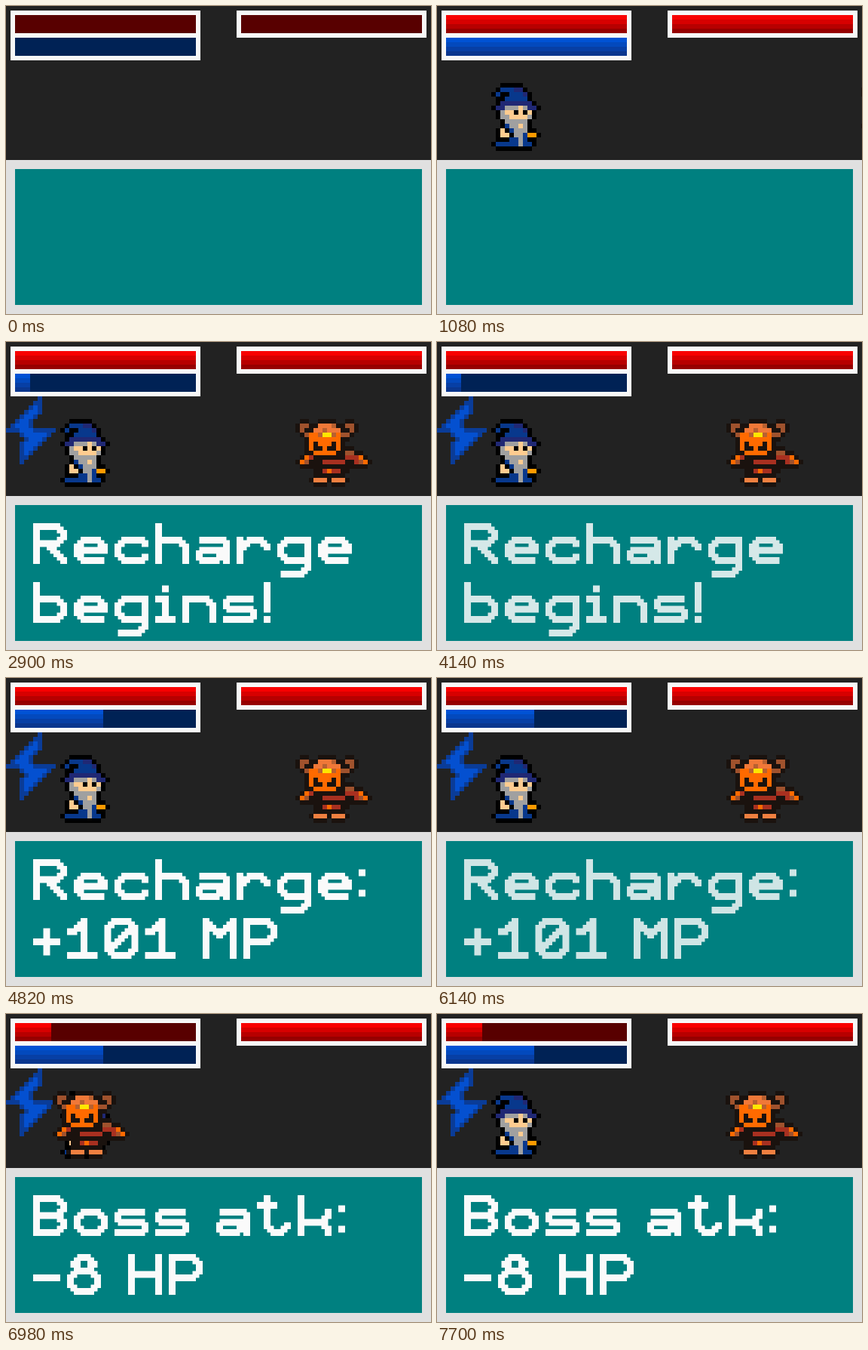
Recreate the animation shown at these times as an HTML page with a canvas. Size 564 by 408 pixels, loop 8000 ms.

```html
<!DOCTYPE html>
<html lang="en">
<head>
<meta charset="utf-8">
<title>Boss battle</title>
<style>
  html, body { margin: 0; width: 100%; height: 100%; overflow: hidden; background: #222; }
  canvas { display: block; width: 564px; height: 408px; }
</style>
</head>
<body>
<canvas id="stage" width="564" height="408"></canvas>
<script>
const LOOP = 8000;
const CELL = 6;      // sprite pixel
const UNIT = 4.5;    // font pixel
const ctx = document.getElementById('stage').getContext('2d');

const clamp = v => Math.max(0, Math.min(1, v));
const span = (t, start, length) => clamp((t - start) / length);
const quadOut = u => 1 - (1 - u) ** 2;
const quadInOut = u => u < .5 ? 2 * u * u : 1 - 2 * (1 - u) ** 2;
const cubicInOut = u => u < .5 ? 4 * u ** 3 : 1 - 4 * (1 - u) ** 3;
const mix = (a, b, u) => a + (b - a) * u;
const points = text => text.split(' ').map(p => p.split(',').map(Number));

// Pen strokes of a 2x2 brush; every bend inside a stroke is rounded.
const STEM = '0,0 0,10';
const ARCH = '0,4 8,4 8,10';
const GLYPHS = {
  R: [STEM, '0,0 8,0 8,5 0,5', '3,5 8,10'],
  B: [STEM, '0,0 8,0 8,5 0,5', '0,5 8,5 8,10 0,10'],
  H: [STEM, '8,0 8,10', '0,5 8,5'],
  M: [STEM, '8,0 8,10', '0,0 4,4', '4,4 8,0'],
  P: [STEM, '0,0 8,0 8,6 0,6'],
  a: ['1,4 7,4 8,5 8,10', '8,7 0,7 0,10 5,10 6,9'],
  b: [STEM, '0,4 8,4 8,10 0,10'],
  c: ['8,5 8,4 0,4 0,10 8,10 8,9'],
  e: ['8,7 8,4 0,4 0,10 7,10', '0,7 8,7'],
  g: ['8,4 0,4 0,10 8,10', '8,4 8,14 1,14'],
  h: [STEM, ARCH],
  i: ['2,1 2,1', '0,4 2,4', '2,4 2,10', '0,10 4,10'],
  k: [STEM, '0,7 8,7 8,4', '0,7 8,7 8,10'],
  n: ['0,4 0,10', ARCH],
  o: ['4,4 8,4 8,10 0,10 0,4 4,4'],
  r: ['0,4 0,10', '1,6 3,4', '3,4 8,4 8,6'],
  s: ['7,4 0,4 0,7 8,7 8,10 0,10'],
  t: ['2,0 2,10 8,10 8,8', '0,2 4,2'],
  0: ['4,0 8,0 8,10 0,10 0,0 4,0', '1,8 7,2'],
  1: ['0,3 1,3', '1,3 4,0', '4,0 4,10', '0,10 7,10'],
  8: ['4,0 7,0 7,4 1,4 1,0 4,0', '4,4 8,4 8,10 0,10 0,4 4,4'],
  '+': ['0,6 6,6', '3,3 3,9'],
  '-': ['0,6 6,6'],
  ':': ['0,3 0,3', '0,9 0,9'],
  '!': ['0,0 0,7', '0,10 0,10'],
  ' ': []
};

const reach = (a, b) => Math.max(Math.abs(b[0] - a[0]), Math.abs(b[1] - a[1]));
const toward = (a, b, d) => [0, 1].map(i => a[i] + (b[i] - a[i]) * d / reach(a, b));

function rounded(pts) {
  const last = pts.length - 1;
  return pts.flatMap((p, i) => {
    if (i === 0 || i === last) return [p];
    const before = reach(p, pts[i - 1]) * (i === 1 ? 1 : .5);
    const after = reach(p, pts[i + 1]) * (i === last - 1 ? 1 : .5);
    const r = Math.min(2, Math.floor(before), Math.floor(after));
    return [toward(p, pts[i - 1], r), toward(p, pts[i + 1], r)];
  });
}

function stroke(path, pts, x, y) {
  for (let i = 1; i < pts.length; i++) {
    const [a, b] = [pts[i - 1], pts[i]];
    const n = reach(a, b) || 1;
    for (let k = 0; k <= n; k++) {
      const [u, v] = [0, 1].map(j => Math.round(mix(a[j], b[j], k / n)));
      path.rect(x + u * UNIT, y + v * UNIT, 2 * UNIT, 2 * UNIT);
    }
  }
}

function message(...lines) {
  const path = new Path2D();
  lines.forEach((line, row) => {
    let x = 36;
    for (const ch of line) {
      const strokes = GLYPHS[ch].map(points);
      const width = Math.max(2, ...strokes.flat().map(p => p[0])) + 2;
      strokes.forEach(s => stroke(path, rounded(s), x, 240 + 78 * row));
      x += (ch === ':' || ch === '!' ? 4 : width + 2) * UNIT;
    }
  });
  return path;
}

// Two points give a box, more give a polygon.
function shape(text) {
  const pts = points(text);
  const path = new Path2D();
  if (pts.length === 2) {
    const [[x, y], [r, b]] = pts;
    path.rect(x, y, r - x, b - y);
  } else pts.forEach(p => path.lineTo(...p));
  return path;
}

// Samples the shapes on a coarse grid and edges the result with one colour.
function sprite(cols, rows, edge, inside, layers) {
  const image = document.createElement('canvas');
  image.width = cols * CELL;
  image.height = rows * CELL;
  const g = image.getContext('2d');
  const shapes = layers.flatMap(([color, ...list]) => list.map(s => [color, shape(s)]));
  const colorAt = (x, y) =>
    shapes.reduce((c, [color, path]) => g.isPointInPath(path, x + .5, y + .5) ? color : c, null);
  for (let y = 0; y < rows; y++) for (let x = 0; x < cols; x++) {
    const color = colorAt(x, y);
    const around = [colorAt(x - 1, y), colorAt(x + 1, y), colorAt(x, y - 1), colorAt(x, y + 1)];
    const onEdge = inside ? color && around.includes(null) : !color && around.some(Boolean);
    if (!color && !onEdge) continue;
    g.fillStyle = onEdge ? edge : color;
    g.fillRect(x * CELL, y * CELL, CELL, CELL);
  }
  return image;
}

const wizard = sprite(11, 15, '#000', false, [
  ['#08388c', '2,1 7,2', '1,2 2,3', '4,2 8,2 8,4 3,4', '3,9 4,10', '4,9 8,13', '1,13 9,14'],
  ['#202874', '5,1 7,2', '7,2 8,3', '2.4,4 8.6,4 10,6 1,6'],
  ['#a0a0a0', '3,5 8,6', '2,6 9,8', '3,8 8,8 8,11 7,11 7,14 6,14 6,12 5.6,12'],
  ['#ffcc90', '6,5 7,6', '3,6 9,7', '4,7 8,8', '6,9 7,10', '2,10 3,12', '3,11 4,12'],
  ['#ff9a00', '8,11 10,12'],
  ['#000', '5,6 6,7', '7,6 8,7', '3,10 4,11', '4,11 5,12']
]);

const DARK = '#1a120e';
const boss = sprite(17, 15, DARK, false, [
  [DARK, '4,8 12,11', '5,11 11,12'],
  ['#a0522d', '1,1 3,2', '1,2 2,3', '2,3 4,4', '11,1 13,2', '12,2 13,3', '10,3 12,4', '11,7 13,8', '2,9 3,10', '14,9 15,10'],
  ['#ff6a00', '5.4,1 8.6,1 10,2.4 10,7 9,7 9,8 4,8 4,7 3,7 3,3'],
  ['#f07838', '5.4,1 8.6,1 10,2.4 10,3 3,3'],
  ['#b86030', '8,1 9,2', '6,2 7,3', '5,3 9,4'],
  ['#ffe600', '6,3 8,4'],
  [DARK, '4,5 5,7', '5,6 6,7', '8,5 9,7', '7,6 8,7'],
  ['#a83020', '3,8 4,9', '11,8 14,9', '6,9 11,10', '13,9 14,10', '6,11 10,12'],
  ['#ff6a00', '2,8 3,9', '1,9 2,10', '14,8 15,9', '15,9 16,10', '7,11 8,12'],
  ['#f08040', '4,13 7,14', '8,13 11,14']
]);

const bolt = sprite(11, 15, '#0a3c98', true, [
  ['#0450d0', '8,0 8,3 6,5 6,7 11,7 11,7.6 3.6,15 3,15 3,11 4,10 4,9 3,8 0,8 0,7.5']
]);

const begins = message('Recharge', 'begins!');
const gain = message('Recharge:', '+101 MP');
const attack = message('Boss atk:', '-8 HP');

const RED = [[248, 0, 0], [150, 0, 0]];
const BLUE = [[0, 82, 212], [10, 54, 142]];

function box(color, x, y, w, h) {
  ctx.fillStyle = color;
  ctx.fillRect(x, y, w, h);
}

function bar(x, y, value, empty, [top, bottom]) {
  box(empty, x, y, 240, 24);
  for (let i = 0; i < 4; i++) {
    const color = top.map((c, k) => Math.round(mix(c, bottom[k], i / 3)));
    box(`rgb(${color})`, x, y + i * CELL, Math.round(240 * value), CELL);
  }
}

function put(image, x, y, alpha = 1) {
  ctx.globalAlpha = alpha;
  ctx.drawImage(image, Math.round(x), y);
  ctx.globalAlpha = 1;
}

function say(path, alpha) {
  ctx.globalAlpha = alpha;
  ctx.fillStyle = '#fafafa';
  ctx.fill(path);
  ctx.globalAlpha = 1;
}

const tween = (t, start) => quadInOut(span(t, start, 480));
const fadeIn = (t, start) => quadOut(span(t, start, 300));

function draw(t) {
  const fill = tween(t, 10);
  const hp = fill - .8 * tween(t, 6370);
  const mp = fill - 229 / 250 * tween(t, 2420) + 101 / 250 * tween(t, 4355);

  box('#222', 0, 0, 564, 204);
  box('#f8f8f8', 6, 6, 252, 66);
  box('#f8f8f8', 306, 6, 252, 36);
  bar(12, 12, hp, '#580000', RED);
  bar(12, 42, mp, '#002255', BLUE);
  bar(312, 12, fill, '#580000', RED);

  put(bolt, 0, 72, fadeIn(t, 2420));
  put(wizard, 72, 102, fadeIn(t, 390));

  const lunge = cubicInOut(1 - Math.abs(span(t, 6364, 1400) * 2 - 1));
  put(boss, mix(564, 384, quadInOut(span(t, 1040, 800))) - 324 * lunge, 102);

  box('#e0e0e0', 0, 204, 564, 204);
  box('#008080', 12, 216, 540, 180);
  if (t < 4355) say(begins, fadeIn(t, 2420) * (1 - span(t, 4105, 250)));
  else if (t < 6364) say(gain, fadeIn(t, 4355) * (1 - span(t, 6095, 269)));
  else say(attack, fadeIn(t, 6364));
}

const began = performance.now();
function tick() {
  draw((performance.now() - began) % LOOP);
  requestAnimationFrame(tick);
}
tick();
</script>
</body>
</html>
```
